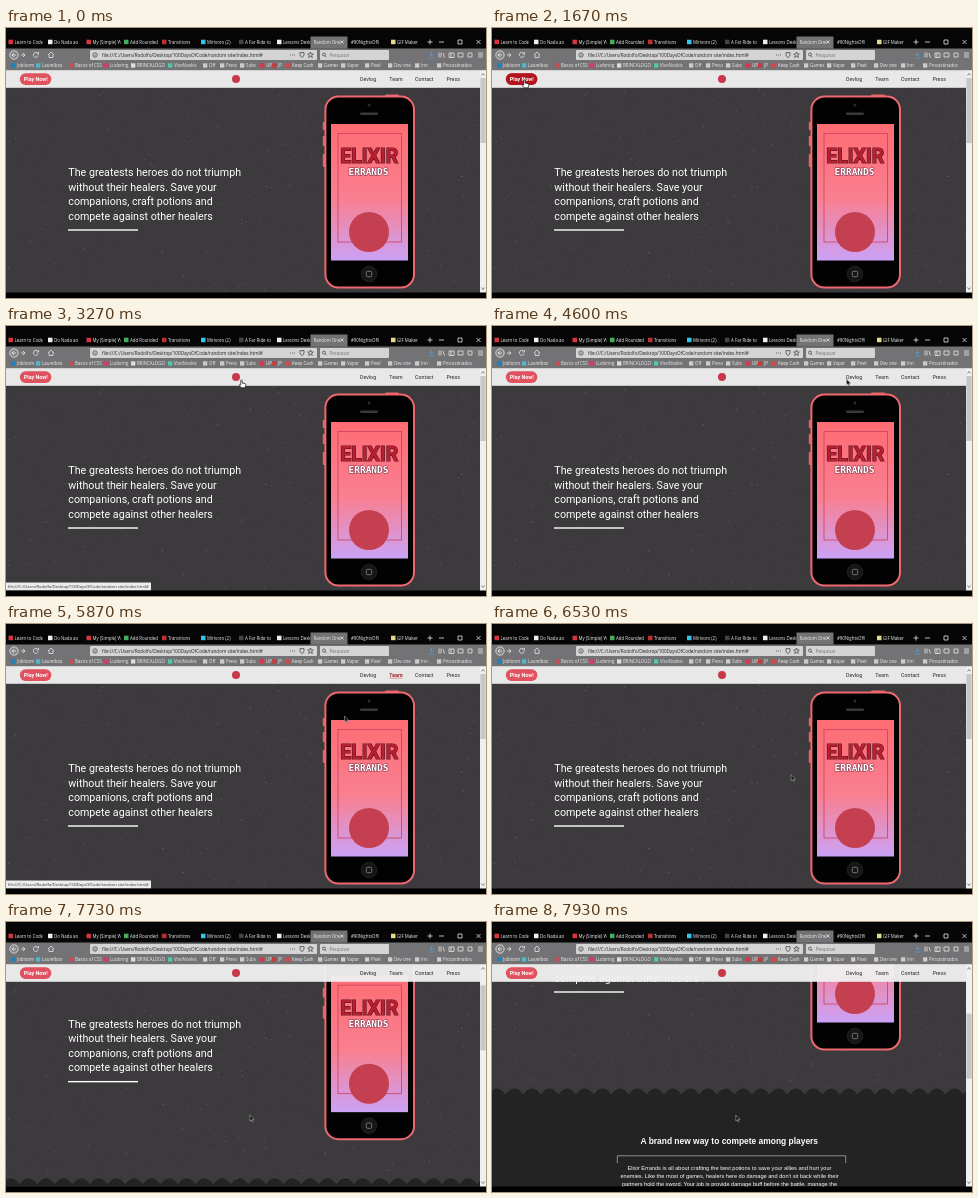
Animation, 480 px wide and 270 px high, one loop 8000 ms. Source, as an HTML page:

```html
<!DOCTYPE html>
<html lang="en">
<head>
<meta charset="utf-8">
<title>Random One</title>
<style>
html, body { margin: 0; width: 100%; height: 100%; overflow: hidden; background: #000; }
svg { display: block; width: 100%; height: 100%; }
.ui { font-family: "Open Sans", sans-serif; font-size: 4.4px; fill: #f2f2f3; }
.site { font-family: Roboto, sans-serif; }
.body { font-family: "Liberation Sans", Arial, sans-serif; font-size: 5.62px; fill: #fff; text-anchor: middle; }
.line { fill: none; stroke: #e6e6e8; stroke-width: .8; }
.dark { stroke: #4a4a4c; }
</style>
</head>
<body>
<svg id="stage" viewBox="0 0 480 270">
  <defs>
    <linearGradient id="sky" x2="0" y2="1">
      <stop offset="0" stop-color="#ff6c73"/>
      <stop offset=".55" stop-color="#f97f90"/>
      <stop offset="1" stop-color="#cba2f7"/>
    </linearGradient>
    <clipPath id="view"><rect y="42" width="474" height="222.5"/></clipPath>
    <clipPath id="tabClip"><rect width="28" height="12"/></clipPath>
  </defs>

  <g clip-path="url(#view)">
    <g id="page">
      <rect y="42" width="474" height="265" fill="#3c3a3c"/>
      <g id="specks"></g>
      <path id="lower" fill="#232323"/>

      <g id="heading" class="site" font-size="10.7" fill="#fff"></g>
      <rect x="62" y="201.3" width="70" height="1.4" fill="#fff"/>

      <g id="phone">
        <g fill="#e8646c">
          <rect x="379" y="66.5" width="14" height="3" rx="1"/>
          <rect x="316.8" y="94" width="3" height="8" rx="1"/>
          <rect x="316.8" y="108" width="3" height="10" rx="1"/>
          <rect x="316.8" y="126" width="3" height="13" rx="1"/>
        </g>
        <rect x="319.4" y="68.6" width="88.6" height="190.9" rx="13" fill="#020202" stroke="#f0686f" stroke-width="2"/>
        <circle cx="363" cy="77" r="1.5" fill="#2a2a30"/>
        <rect x="354" y="84.5" width="18" height="2.6" rx="1.3" fill="#39393c"/>
        <rect x="325" y="96" width="77" height="136.5" fill="url(#sky)"/>
        <rect x="332" y="105.5" width="63.5" height="108.5" fill="none" stroke="#c9405f" stroke-width=".8"/>
        <g text-anchor="middle" font-weight="bold" paint-order="stroke" stroke-linejoin="miter">
          <text x="363.2" y="135.3" class="site" font-size="19.5" fill="#b8202f" stroke="#5e1526" stroke-width="1.2">ELIXIR</text>
          <text x="362.5" y="147" font-family="DejaVu Sans Mono, monospace" font-size="9.5" fill="#fff" stroke="#7c3348" stroke-width="1">ERRANDS</text>
        </g>
        <circle cx="363" cy="204" r="20" fill="#c43f50"/>
        <circle cx="363" cy="246" r="7.8" fill="#161617" stroke="#29292b" stroke-width=".7"/>
        <rect x="360.3" y="243.3" width="5.4" height="5.4" rx="1.2" fill="none" stroke="#8b8b8f" stroke-width=".8"/>
      </g>

      <g id="about" class="body">
        <text x="237.3" y="354.4" font-size="8.43" font-weight="bold">A brand new way to compete among players</text>
        <path d="M125.3 373V365.8H353.7V373" fill="none" stroke="#b8b8b8" stroke-width=".7"/>
      </g>
    </g>

    <rect y="42" width="474" height="17.8" fill="#f0f0f0" opacity=".96"/>
    <circle cx="230" cy="51" r="4" fill="#c8384a"/>
    <g id="play">
      <rect x="13.8" y="45.3" width="31.6" height="11.6" rx="5.8" fill="#df525e"/>
      <rect id="pressed" x="13.8" y="45.3" width="31.6" height="11.6" rx="5.8" fill="#b3141d"/>
      <text x="29.8" y="53" class="site" font-size="5.35" font-weight="bold" fill="#fff" text-anchor="middle">Play Now!</text>
    </g>
    <g id="menu" class="site" font-size="5.3"></g>
    <g id="status">
      <rect y="256.5" width="145" height="8" fill="#ececec"/>
      <text x="2" y="262" class="ui" style="font-size:4.06px;fill:#333">file:///C:/Users/Rodolfo/Desktop/100DaysOfCode/random site/index.html#</text>
    </g>
  </g>

  <rect x="474" y="42" width="6" height="222.5" fill="#f0f0f0"/>
  <path d="M475.500 47.500l1.500-2 1.500 2M475.500 259.500l1.500 2 1.500-2" fill="none" stroke="#666" stroke-width=".8"/>
  <rect id="thumb" x="474.400" y="50" width="5.200" height="65" fill="#c6c6c6"/>

  <g id="browser" class="ui">
    <rect width="480" height="21" fill="#060606"/>
    <rect y="20.500" width="480" height="21.700" fill="#737375"/>
    <rect x="304.500" y="8.500" width="37" height="12.200" fill="#737375"/>
    <rect x="84" y="22" width="227" height="10" rx="1" fill="#d4d4d5"/>
    <rect x="314" y="22" width="69" height="10" rx="1" fill="#d4d4d5"/>
    <text x="96" y="28.700" style="font-size:4.63px;fill:#222">file:///C:/Users/Rodolfo/Desktop/100DaysOfCode/random site/index.html#</text>
    <text x="323.500" y="28.700" style="fill:#707072">Pesquisar</text>
    <g class="line">
      <circle cx="8" cy="27" r="4.200" fill="#858587"/>
      <path d="M10 27H6l2-2M6 27l2 2M15 27h4l-2-2M19 27l-2 2"/>
      <path d="M32 25.500a2.500 2.500 0 1 0 .3 2M32.500 24v2h-2"/>
      <path d="M42 27l3-3 3 3M43 26.500v3h4v-3"/>
      <path d="M425.500 24v4l-2-2M425.500 28l2-2M423 30h5" stroke="#3aa0ff"/>
      <path d="M433 24.500v5M435 24.500v5M437 25l1.500 4.500M443 25h5v4.500h-5zM445 25v4.500"/>
      <path d="M452 25h5v4h-5zM462 25h4v4h-4zM472 25h5M472 27h5M472 29h5"/>
      <path d="M334.500 12.500l3 3M337.500 12.500l-3 3M421.500 14h5M424 11.500v5M433 14h5M452 12h4v4h-4zM470.500 12l4 4M474.500 12l-4 4"/>
    </g>
    <g class="line dark">
      <circle cx="89" cy="27" r="2.200"/><path d="M89 26.500v1.700"/>
      <path d="M284 27h5" stroke-dasharray="1 1"/>
      <path d="M294 24.600h4v2q0 2-2 3-2-1-2-3z"/>
      <path d="M304.500 24l.8 2 2 .1-1.600 1.300.6 2.100-1.800-1.200-1.800 1.200.6-2.100-1.600-1.300 2-.1z"/>
      <circle cx="318" cy="26.500" r="1.500"/><path d="M319 27.700l1.500 1.500"/>
    </g>
  </g>

  <g id="pointer" stroke-linejoin="round">
    <path id="arrow" d="M0 0V6L1.400 4.800 2.300 6.900 3.300 6.400 2.400 4.400H4.300Z" fill="#111" stroke="#c4c4c4" stroke-width=".5"/>
    <path id="hand" d="M-.7 .4Q0-.4.700.400V3L3.800 3.700Q4.500 4 4.300 5.200L3.600 7.800H-.3L-2.200 5.200Q-2.300 4.200-.7 4.900Z" fill="#fff" stroke="#111" stroke-width=".7"/>
  </g>
</svg>

<script>
const $ = id => document.getElementById(id);
const clamp = v => Math.max(0, Math.min(1, v));
const smooth = v => (v = clamp(v), v * v * (3 - 2 * v));
const during = (t, [from, to]) => t >= from && t < to;
const fade = (t, [from, to], span = 150) => clamp((t - from) / span) - clamp((t - to) / span);

function add(parent, tag, attrs, text = "") {
  const el = document.createElementNS("http://www.w3.org/2000/svg", tag);
  for (const k in attrs) el.setAttribute(k, attrs[k]);
  el.textContent = text;
  return parent.appendChild(el);
}

// Page
let seed = 7;
const random = () => (seed = seed * 16807 % 2147483647) / 2147483647;
for (let i = 0; i < 900; i++) {
  add($("specks"), "rect", {
    x: random() * 473, y: 60 + random() * 242,
    width: .6 + random() * 1.1, height: .5 + random() * .7,
    fill: random() < .65 ? "#fff" : "#000", opacity: .05 + random() * .13
  });
}
$("lower").setAttribute("d", "M-4 304.500" + "q8.800-12 17.600 0".repeat(28) + "V500H-4Z");

["The greatests heroes do not triumph", "without their healers. Save your",
 "companions, craft potions and", "compete against other healers"]
  .forEach((s, i) => add($("heading"), "text", { x: 62.3, y: 148.4 + i * 14.4 }, s));

["Elixir Errands is all about crafting the best potions to save your allies and hurt your",
 "enemies. Like the most of games, healers here do damage and don't sit back while their",
 "partners hold the sword. Your job is provide damage buff before the battle, manage the"]
  .forEach((s, i) => add($("about"), "text", { x: 237.5, y: 379.5 + i * 8.3 }, s));

const links = [["Devlog", 354], ["Team", 383.3], ["Contact", 409], ["Press", 440.5]].map(([s, x]) => {
  add($("menu"), "text", { x, y: 52.8, fill: "#262626" }, s);
  return add($("menu"), "text", { x, y: 52.8, fill: "#dc4351", "text-decoration": "underline", opacity: 0 }, s);
});

// Browser tabs: title, x, icon colour
[["Learn to Code", 8.5, "#d8333f"], ["Do Nada ao", 48, "#eee"], ["My (Simple) W", 86.5, "#d8333f"],
 ["Add Rounded", 124, "#42b05c"], ["Transitions", 162, "#b83232"], ["Mirivoro (2)", 201, "#35c3e8"],
 ["A Far Ride to", 239, "#444"], ["Lessons Desk", 277, "#eee"], ["Random One", 307.5],
 ["#90NightsOfWork", 345], ["GIF Maker", 391, "#e6d98a"]].forEach(([s, x, icon]) => {
  const g = add($("browser"), "g", { transform: `translate(${x} 8)`, "clip-path": "url(#tabClip)" });
  add(g, "text", { y: 7.6 }, s);
  if (icon) add($("browser"), "rect", { x: x - 6, y: 11.7, width: 4.5, height: 4.5, fill: icon });
});

// Bookmarks: label, x, icon colour
[["Jobloom", 11, "#1b82bd"], ["Laurelbox", 36, "#52b7c9"], ["Basics of CSS", 69, "#c74b58"],
 ["Ludoring", 104, "#d83a67"], ["BRINCALOGO", 131, "#ddd"], ["VivoNookis", 168, "#52c9a9"],
 ["Off", 203, "#ccc"], ["Press", 220, "#ccc"], ["Subs", 240, "#ccc"], ["UP", 260, "#d9364a"],
 ["JP", 272, "#c93a3a"], ["Keep Cash", 286, "#d64747"], ["Games", 318, "#ccc"], ["Vapor", 341, "#ccc"],
 ["Pixel", 365, "#ccc"], ["Dev one", 388, "#ccc"], ["Inn", 415, "#ccc"], ["Procastinados", 437, "#ccc"]]
  .forEach(([s, x, icon]) => {
    add($("browser"), "text", { x, y: 39 }, s);
    add($("browser"), "rect", { x: x - 6, y: 35.3, width: 4.3, height: 4.3, fill: icon });
  });

// Pointer route: time, x, y
const route = [[70, 300, 150], [870, 120, 110], [1200, 120, 110], [1560, 32.5, 52], [1950, 32.5, 52],
  [2750, 230, 54], [2930, 230, 55], [3130, 235.5, 54], [3350, 235.5, 54], [3870, 290, 85],
  [4560, 354.5, 53], [4750, 354.5, 53], [4900, 362, 51.5], [5250, 362, 51.5], [5450, 389, 51.5],
  [5730, 389, 51.5], [5870, 338.5, 92], [6470, 300, 150], [7270, 243.8, 193]];
const hover = { play: [1480, 2080], logo: [2700, 3420], devlog: [4800, 5330], team: [5370, 5780] };

function pointerAt(t) {
  const i = route.findIndex(p => p[0] > t);
  if (i < 1) return route.at(i).slice(1);
  const [a, x0, y0] = route[i - 1], [b, x1, y1] = route[i], k = smooth((t - a) / (b - a));
  return [x0 + (x1 - x0) * k, y0 + (y1 - y0) * k];
}

const LOOP = 8000, start = performance.now();

function draw(now) {
  const t = Math.max(0, now - start) % LOOP;
  const scroll = 132 * smooth((t - 7610) / 320);
  $("page").setAttribute("transform", `translate(0 ${-scroll})`);
  $("thumb").setAttribute("y", 50 + scroll * .315);

  $("pressed").setAttribute("opacity", fade(t, hover.play));
  links[0].setAttribute("opacity", fade(t, hover.devlog));
  links[1].setAttribute("opacity", fade(t, [hover.team[0], hover.team[1] + 110]));
  const shown = [[1720, 2160], [2780, 3500], [4870, 5950]].some(r => during(t, r));
  $("status").style.display = shown ? "" : "none";

  const [x, y] = pointerAt(t);
  const hand = Object.values(hover).some(r => during(t, r));
  $("pointer").setAttribute("transform", `translate(${x} ${y})`);
  $("pointer").style.display = t < 70 ? "none" : "";
  $("hand").style.display = hand ? "" : "none";
  $("arrow").style.display = hand ? "none" : "";
  requestAnimationFrame(draw);
}
draw(start);
</script>
</body>
</html>
```
